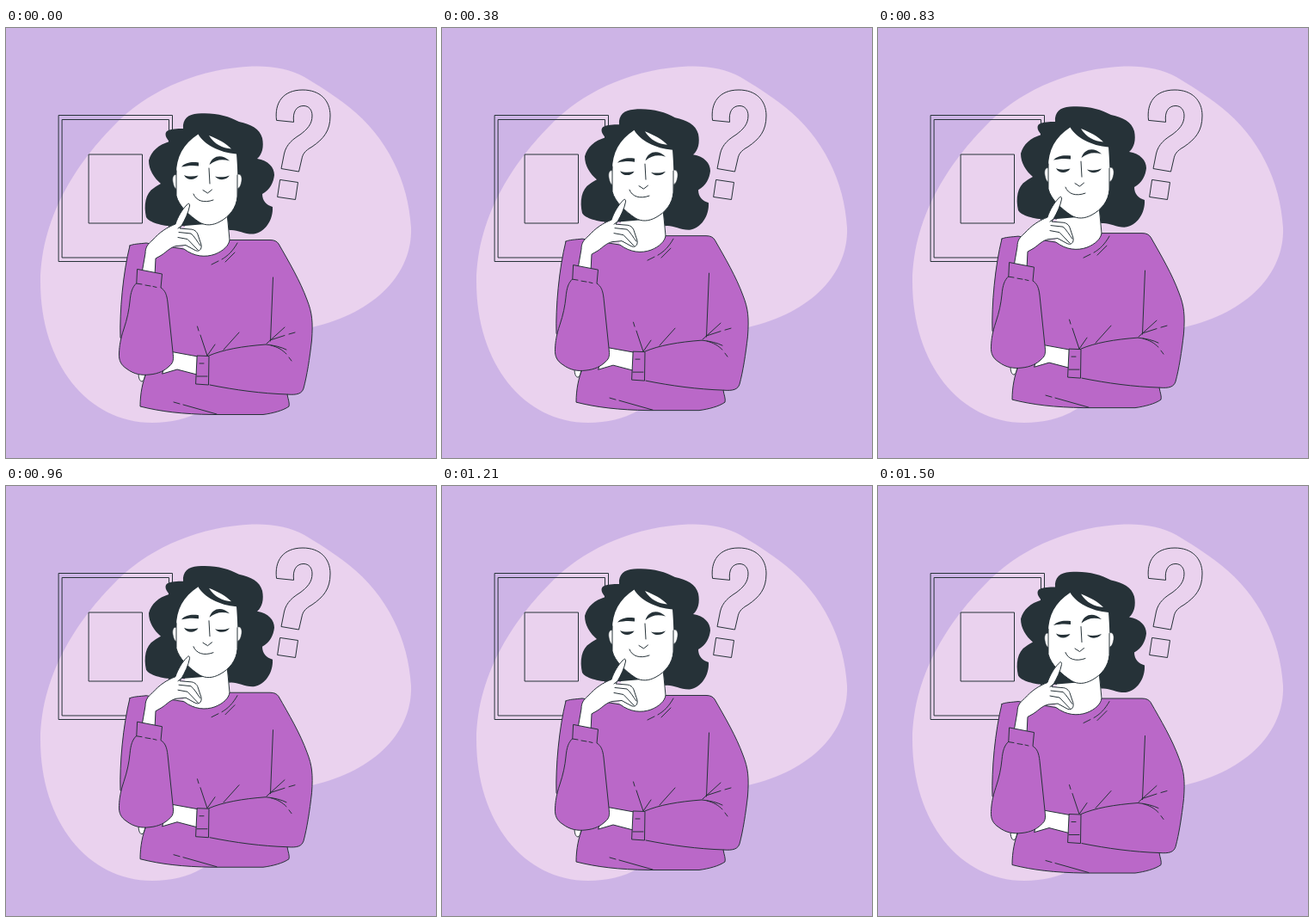
Recreate the animation shown at these times as an HTML page. Size 500 by 500 pixels, loop 1540 ms.

```html
<!DOCTYPE html>
<html lang="en">
<head>
<meta charset="utf-8">
<title>Thinking</title>
<style>
  html, body { margin: 0; width: 100%; height: 100%; overflow: hidden; background: #cdb4e6; }
  svg { display: block; width: 100%; height: 100%; }
  .line { fill: none; }
  .ink { fill: #263238; stroke: none; }
  .skin { fill: #fff; }
  .knit { fill: #ba68c8; }
  .bare { stroke: none; }
</style>
</head>
<body>
<svg viewBox="0 0 500 500" stroke="#263238" stroke-width="1" stroke-linecap="round" stroke-linejoin="round">
  <path class="bare" fill="#ead2ee" d="M287 44.500C310 44 331 48 347 57C362 66 380 77 399 92C443 127 468 178 471 232C473 285 430 331 356 348C300 362 300 365 270 405C245 440 215 459 170 459C95 459 40 390 40 295C41 215 87 150 134 105C171 71 225 47 287 44.500Z"/>

  <g class="line">
    <path d="M61.500 101.500H193.500V271.500H61.500ZM65.500 106.500H189.500V267H65.500ZM96.500 147H158.500V227H96.500Z"/>
    <path d="M314.500 107C312 87 322 72 345 72C365 72 377 84 377 102C377 120 369 129 356 138C347 143 345 147 344 152L340.500 167L320 163.500L323.500 146C326 135 334 129 342 124C350 118 356 112 356 102C356 95 352 90.500 346 90.500C338 90.500 333 97 334.500 109Z"/>
    <path d="M319 176.500L339.500 179.500L336.500 199.500L316 196.500Z"/>
  </g>

  <g id="woman">
    <!-- hair and neck -->
    <path class="ink" d="M206 117C205 106 212 100 223 99.500C243 98 258 102 271 109C285 112 295 117 298 128C300 138 298 147 292 152C305 154 312 162 312 171C311 180 307 188 298 193C298 201 303 206 310 208C311 223 301 238 288 239.500C277 240 269 234 260 235L203 230C187 232 167 227 163 220C160 206 162 192 172 186C174 184 177 183 180 181C172 174 166 165 166 154C169 143 177 136 190 132C186 128 184 123 187 120C192 117 199 117 206 117Z"/>
    <path class="skin bare" d="M208 230L232 228L257 216L261 250L250 268H215L206 258Z"/>
    <path class="line" d="M257.500 220L260 246.500"/>

    <!-- far hand and torso -->
    <path class="skin" d="M154 401C154 408 156 411 158 411C161 410 161 406 162 402Z"/>
    <path class="knit" d="M144 253C148 251 155 251 163 250L207 257C219 266 232 267 243 263C253 259 259 253 260 246.500H307C312 246.500 315 248 317 251C329 272 342 294 350 316C356 331 357 342 355.500 363C353 385 350 404 346 419C344 425 339 427 327 426C328 432 330 436 329 440C322 445 310 448 299 449.500H240C205 449 180 446 156 440C156 425 159 411 163 402L133 360C132 330 136 285 144 253Z"/>
    <path class="line" d="M269 250C264 259 258 265 251 269M266 261L255 272M247 271L239 275
      M310.500 290L307.500 364M303 367L324 348M307 363L324 357.500M329 356L336 354
      M226 357L234 381L243 368M222.500 347L224 352M253 374L271 354
      M195 435L202 437M206 438L245 449"/>

    <!-- folded arm -->
    <path class="skin" d="M190 376L223 382L222 403L199 397L182 402Z"/>
    <path class="line" d="M236 381C252 374 275 370 302 368C312 369 320 371 326 374M308 369C316 371 321 374 326 379M329 383L332 387M327 426C297 425 267 421 237 415"/>
    <path class="knit" d="M222.500 381L236 381.500L235.500 415L221 414Z"/>
    <path class="line" d="M225 390H230M222 405H234"/>

    <!-- face -->
    <path class="skin" stroke-width=".6" d="M268 171C272 168 275 172 274 178C273 184 271 187 268 187ZM199 171C195 169 193 173 194 179C195 185 197 187 199 188Z"/>
    <path class="skin bare" d="M198 170C198 150 206 135 223.500 123.500C230 135 248 145 268 146.500C269 159 270 177 269 196C268 209 260 219 249 225C240 230 232 230 225 226C213 218 201 207 198 195Z"/>
    <path class="line" d="M198 166V195C201 207 213 218 225 226C232 230 240 230 249 225C260 219 268 209 269 196V171"/>
    <path class="skin bare" d="M236 125C246 129 256 134 262 140.500C252 140 242 135 236 125Z"/>
    <path class="ink" d="M204 161.500C209 156 216 155.500 224 156.500L224 160.500C217 159.500 211 160 204 161.500Z"/>
    <path class="ink" d="M236.500 159C240 148 251 146 260 154.500C251 152 244 153 236.500 159Z"/>
    <path class="ink" d="M207 171C211 173 218 173 223.500 171.500C220 177.500 210 177.500 207 171ZM243 172.500C248 174 255 173.500 260 171.500C256 177.500 247 177.500 243 172.500Z"/>
    <path class="line" d="M236 163L237 181M229 188.500L234.500 192L239.500 188M218 193C221 201 230 204 241 200"/>

    <!-- raised hand -->
    <path class="skin" d="M158 285L162 262C162 255 165 251 170 247C179 237 187 232 197 228C200 219 205 211 210 206C212 203 214 204 213.500 207C212 215 208 223 204 230L202 233L214 234C219 234 222 237 223 240L227 252C228 258 224 261 219 258L209 252.500L198 253.500C191 255 187 260 181 264L174 268L173 288Z"/>
    <path class="line" d="M201 237.500L215 239C219 242 222 248 226 253M200 243.500L211 245.500L223 258M204 230L200 233"/>

    <!-- raised sleeve -->
    <path class="knit" d="M153 280.500L181.500 286L180 302C185 305 187 310 188 319L194 377C195 385 195 389 190 393C185 398 178 402 167 403C158 404 149 403 140 396C134 392 131 387 131.500 378C132 369 133 362 137 350C141 338 143 328 144 318C145 307 147 301 151.500 297Z"/>
    <path class="line" d="M151.500 297L158 298M162 299L168 300M171 300.500L175 301.500"/>
  </g>
</svg>
<script>
  const LOOP = 1540, STEPS = 37, RISE = 10, LEAD = 50;
  const woman = document.getElementById('woman');

  // Height of a steady up-and-down float at time t.
  const lift = t => {
    const p = ((t + LEAD) / LOOP) % 1;
    return RISE * (1 - Math.abs(2 * p - 1));
  };

  const start = performance.now();
  function draw(now) {
    const t = Math.max(0, now - start) % LOOP;
    const step = Math.floor(t / LOOP * STEPS + 0.15) % STEPS;
    const dy = lift(0) - lift(step * LOOP / STEPS);
    woman.setAttribute('transform', `translate(0 ${dy.toFixed(3)})`);
    requestAnimationFrame(draw);
  }
  draw(start);
</script>
</body>
</html>
```
